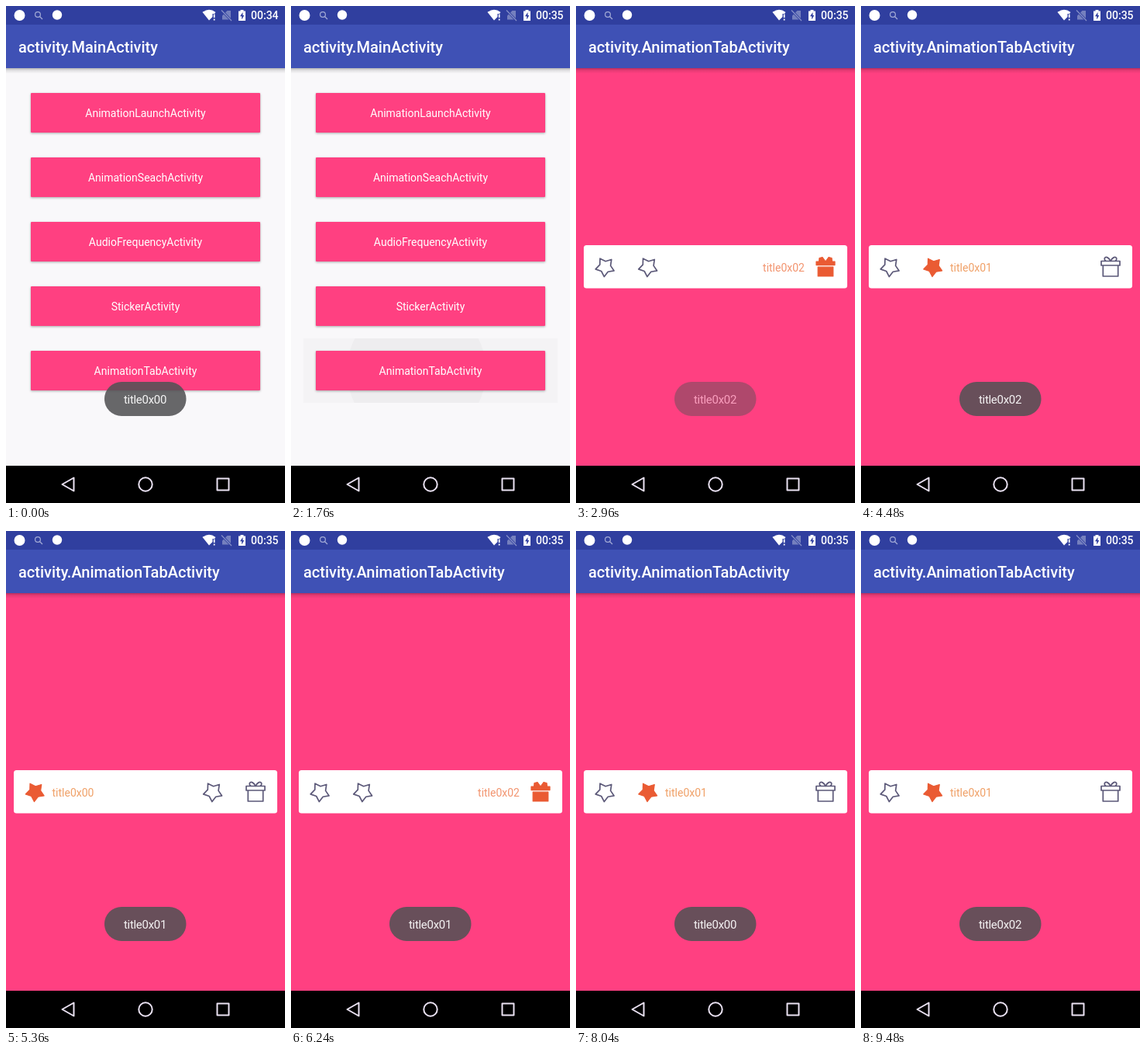
Write an HTML page that moves like this. It is 360x640 px and loops after 9.52 s.

```html
<!DOCTYPE html>
<html lang="en">
<head>
<meta charset="utf-8">
<title>Animated tabs</title>
<style>
  html, body { margin: 0; width: 100%; height: 100%; overflow: hidden; background: #000; }
  svg { display: block; width: 360px; height: 640px; font: 14px Roboto, sans-serif; }
  .title { font-size: 20px; font-weight: 500; fill: #fff; }
  .button { fill: #ff4081; filter: drop-shadow(0 1.5px 1.5px rgba(0, 0, 0, .32)); }
  .label { fill: #fff; text-anchor: middle; }
  .line { fill: none; stroke: #5b5878; stroke-width: 1.7; stroke-linejoin: round; stroke-linecap: round; }
  .full { fill: #ea5b33; stroke: #ea5b33; stroke-width: 1.2; stroke-linejoin: round; }
  .nav { fill: none; stroke: #eae2f2; stroke-width: 2; stroke-linejoin: round; }
</style>
</head>
<body>
<svg viewBox="0 0 360 640">
  <defs>
    <linearGradient id="shade" x2="0" y2="1">
      <stop offset="0" stop-color="#000" stop-opacity=".28"/>
      <stop offset=".4" stop-color="#000" stop-opacity=".1"/>
      <stop offset="1" stop-color="#000" stop-opacity="0"/>
    </linearGradient>
    <clipPath id="row"><rect x="16" y="428" width="328" height="83"/></clipPath>
    <path id="star"/>
    <g id="bar">
      <rect y="80" width="360" height="7" fill="url(#shade)"/>
      <rect width="360" height="80" fill="#3f51b5"/>
    </g>
  </defs>

  <g id="main">
    <rect width="360" height="592" fill="#f9f8fa"/>
    <g id="ripple" clip-path="url(#row)">
      <rect x="16" y="428" width="328" height="83" fill-opacity=".018"/>
      <circle id="wave" cx="162" cy="470" fill-opacity=".024"/>
    </g>
    <g id="buttons"></g>
    <use href="#bar"/>
    <text class="title" x="16" y="59.5">activity.MainActivity</text>
  </g>

  <g id="tabs">
    <rect width="360" height="650" fill="#ff4081"/>
    <use href="#bar"/>
    <text class="title" x="16" y="59.5">activity.AnimationTabActivity</text>
    <rect x="10" y="308" width="340" height="55.5" rx="3.5" fill="#fff"/>
    <g class="tab">
      <use class="line" href="#star"/>
      <use class="full" href="#star"/>
      <text x="22" y="5.5" fill="#f0a168">title0x00</text>
    </g>
    <g class="tab">
      <use class="line" href="#star"/>
      <use class="full" href="#star"/>
      <text x="22" y="5.5" fill="#f0a168">title0x01</text>
    </g>
    <g class="tab">
      <path class="line" d="M-12-7.5H12V-2H-12ZM-9.7-2V12H9.7V-2M0-7.5C-2-12-6-14-7.5-11.5C-8.5-9.5-7-8-5.5-7.5M0-7.5C2-12 6-14 7.5-11.5C8.5-9.5 7-8 5.5-7.5"/>
      <path class="full" d="M-12-7H12V-2.4H-12ZM-9.8 .2H9.8V12H-9.8ZM0-7L-4-12.5L-8-11.5L-8.5-7ZM0-7L4-12.5L8-11.5L8.5-7Z"/>
      <text x="-27" y="5.5" text-anchor="end" fill="#f2946f">title0x02</text>
    </g>
  </g>

  <g id="toasts"></g>

  <rect width="360" height="24" fill="#303f9f"/>
  <circle cx="17.5" cy="12" r="7" fill="#fff"/>
  <g fill="none" stroke="#a3abd6" stroke-width="1.2">
    <circle cx="41" cy="11" r="3.4"/>
    <path d="M43.5 13.5L47 17"/>
  </g>
  <circle cx="66" cy="11.5" r="6.2" fill="#fff"/>
  <path d="M253.500 8Q262 1.500 270.500 8L269 10H266.500V14L262 18.500Z" fill="#fff"/>
  <path d="M268.700 10.500V15M268.700 16.500V18.500" stroke="#fff" stroke-width="1.700"/>
  <path d="M279 12.500L285.500 6H290V17.500H279Z" fill="#7580be"/>
  <path d="M278 5.500L291 19" stroke="#303f9f" stroke-width="3"/>
  <path d="M278 5.500L291 19" stroke="#8791c8" stroke-width="1.200"/>
  <path d="M300 6.500H302.500V5H306.500V6.500H309V19H300Z" fill="#fff"/>
  <path d="M305.500 8L302 13.200H304.200V17.500L307.300 12H305.500Z" fill="#303f9f"/>
  <text id="clock" x="316" y="17" fill="#fff" font-weight="500"></text>

  <rect y="592" width="360" height="48"/>
  <g class="nav">
    <path d="M87.500 607.500V624.500L72.500 616Z"/>
    <circle cx="180" cy="616" r="8.700"/>
    <rect x="272.500" y="608.500" width="15" height="15"/>
  </g>
</svg>

<script>
const LOOP = 9520, STEP = 40;
const TAB_TIME = 300, FADE = 400;
const OPEN = 1880;
const taps = [[2640, 2], [3660, 1], [4680, 0], [5700, 2], [6900, 1]];
const toastPlan = [
  ['title0x00', -1500, 400],
  ['title0x02', 2835, 4890],
  ['title0x01', 4890, 6945],
  ['title0x00', 6945, 9000],
  ['title0x02', 9000, 11000]
];

const $ = id => document.getElementById(id);
const clamp = v => Math.min(1, Math.max(0, v));
const part = (t, start, length) => clamp((t - start) / length);
const easeOut = x => 1 - (1 - x) ** 2;
const smooth = x => x * x * (3 - 2 * x);

function starPath() {
  const points = Array.from({ length: 10 }, (_, i) => {
    const a = (95 + i * 36) * Math.PI / 180, r = i % 2 ? 7.3 : 12.6;
    return (r * Math.cos(a)).toFixed(2) + ' ' + (r * Math.sin(a)).toFixed(2);
  });
  return 'M' + points.join('L') + 'Z';
}
$('star').setAttribute('d', starPath());

$('buttons').innerHTML = ['AnimationLaunch', 'AnimationSeach', 'AudioFrequency', 'Sticker', 'AnimationTab']
  .map((name, i) => `<g transform="translate(0 ${i * 83})">
    <rect class="button" x="32" y="112" width="296" height="51" rx="1"/>
    <text class="label" x="180" y="143">${name}Activity</text></g>`).join('');

$('toasts').innerHTML = toastPlan.map(([text]) => `<g>
  <rect x="127" y="484" width="105.500" height="44" rx="22" fill="#525254" fill-opacity=".87"/>
  <text class="label" x="179.500" y="512" font-size="15" letter-spacing="-.3" fill-opacity=".93">${text}</text></g>`).join('');

const toasts = [...$('toasts').children];
const tabs = [...document.querySelectorAll('.tab')];

// Share of the selection held by each tab; the first one starts selected.
function selection(t) {
  let share = [1, 0, 0];
  for (const [at, index] of taps) {
    const p = smooth(part(t, at, TAB_TIME));
    share = share.map((s, i) => s + ((i === index) - s) * p);
  }
  return share;
}

function drawTabs(t) {
  const share = selection(t);
  const xs = [37.5, 93 + 174 * share[0], 322];
  tabs.forEach((tab, i) => {
    const [line, full, text] = tab.children;
    tab.setAttribute('transform', `translate(${xs[i]} 336)`);
    line.style.opacity = 1 - share[i];
    full.style.opacity = share[i];
    text.style.opacity = share[i] ** 2;
  });
}

function draw(t) {
  $('clock').textContent = t < 1000 ? '00:34' : '00:35';

  $('ripple').style.opacity = part(t, 1560, 160);
  $('wave').setAttribute('r', 90 * part(t, 1600, 160) + 110 * part(t, 1760, 200));

  $('tabs').style.opacity = easeOut(part(t, OPEN, 200));
  const drop = 47 * (1 - easeOut(part(t, OPEN, 350)));
  $('tabs').setAttribute('transform', `translate(0 ${drop})`);
  drawTabs(t);

  toastPlan.forEach(([, from, to], i) => {
    toasts[i].style.opacity = easeOut(part(t, from, FADE)) * (1 - part(t, to, FADE));
  });
}

const start = performance.now();
function tick() {
  const t = (performance.now() - start) % LOOP;
  draw(Math.floor(t / STEP) * STEP);
  requestAnimationFrame(tick);
}
tick();
</script>
</body>
</html>
```
